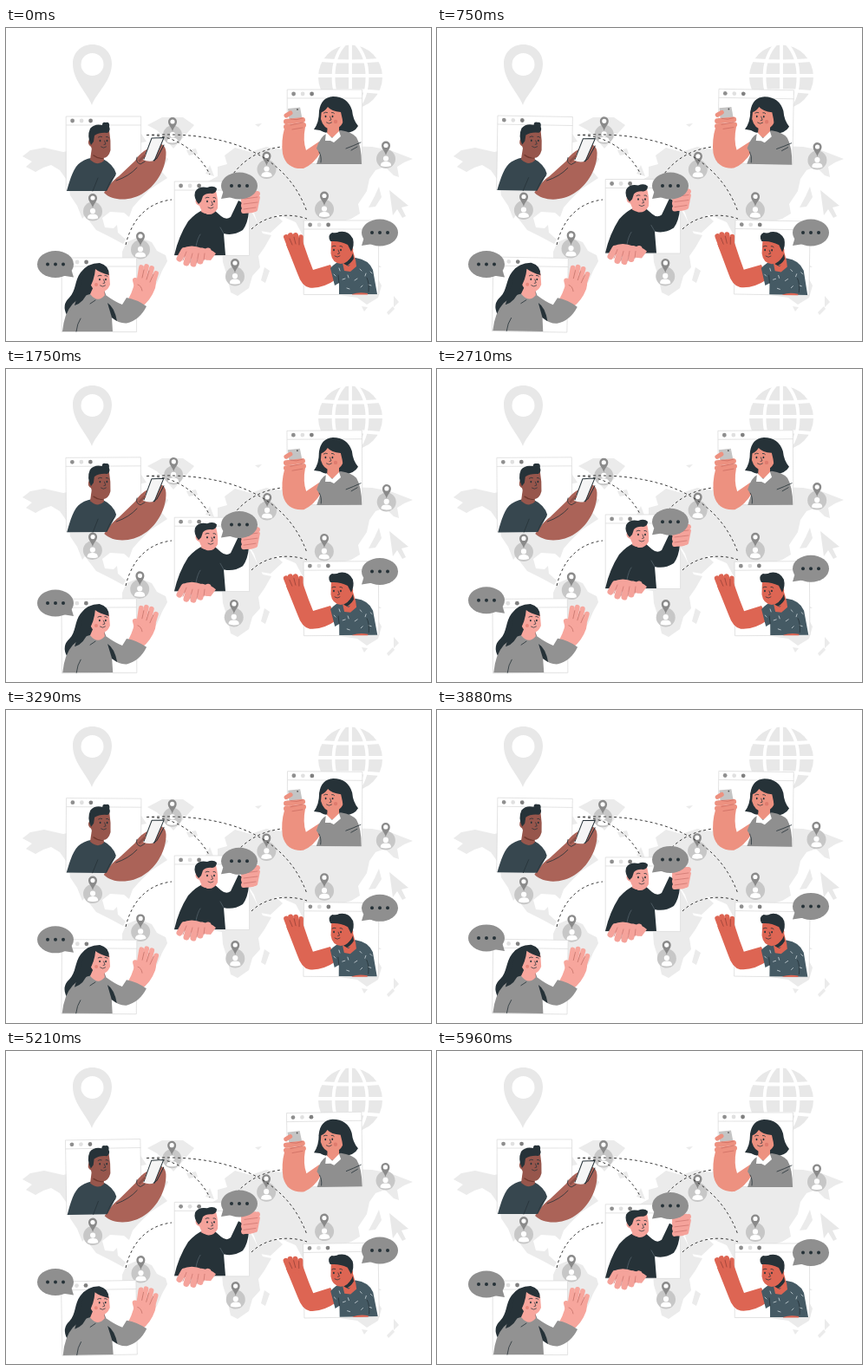
An HTML page with a canvas for the animation above (6 s loop, 490 px wide and 361 px high).

```html
<!DOCTYPE html>
<html lang="en">
<head>
<meta charset="utf-8">
<title>Video call</title>
<style>
html, body { margin: 0; width: 100%; height: 100%; overflow: hidden; background: #fff; }
canvas { display: block; width: 490px; height: 361px; }
</style>
</head>
<body>
<canvas id="stage"></canvas>
<script>
const W = 490, H = 361, LOOP = 6000;
const cv = document.getElementById('stage');
const dpr = window.devicePixelRatio || 1;
cv.width = W * dpr;
cv.height = H * dpr;
const c = cv.getContext('2d');
c.lineCap = c.lineJoin = 'round';

const INK = '#263238', SLATE = '#37474f', BLUE = '#455a64', GREY = '#8f8f8f', MAP = '#ebebeb', SOFT = '#e8e8e8';

const cache = {};
const path = d => cache[d] || (cache[d] = new Path2D(d));
function fill(color, d) { c.fillStyle = color; c.fill(path(d)); }
function line(color, w, d) { c.strokeStyle = color; c.lineWidth = w; c.stroke(path(d)); }
function oval(color, x, y, rx, ry = rx) {
  c.fillStyle = color;
  c.beginPath();
  c.ellipse(x, y, rx, ry, 0, 0, 7);
  c.fill();
}
// Thick rounded stroke, used for fingers
function finger(color, w, x1, y1, x2, y2) { line(color, w, `M${x1} ${y1}L${x2} ${y2}`); }

// Rises 10 px and returns over one loop, resting until the delay has passed
function floatY(t, delay) {
  const p = Math.max(0, t - delay) / LOOP;
  return -20 * Math.min(p, 1 - p);
}

// Linear rock of one degree each way: 0, 1, 0, -1, 0
function rock(t, period) {
  const p = (t / period + 0.25) % 1;
  return (1 - 4 * Math.abs(p - 0.5)) * Math.PI / 180;
}

function about(x, y, angle, draw) {
  c.save();
  c.translate(x, y);
  c.rotate(angle);
  c.translate(-x, -y);
  draw();
  c.restore();
}

function worldMap() {
  // North America
  fill(MAP, 'M19 148L28 141L44 138L66 143L84 139L106 143L128 135L146 139L160 146L170 139L187 151L179 165L186 173L166 186L153 199L146 207L142 218L136 213L120 212L111 219L114 230L124 231L128 227L129 236L138 244L135 249L120 241L104 233L91 216L88 220L82 205L74 193L72 178L62 164L52 158L43 161L34 166L23 160L30 154Z');
  // Greenland and northern islands
  fill(MAP, 'M163 112L180 103L204 103L217 112L209 121L201 130L193 139L183 127L174 118Z');
  fill(MAP, 'M106 128L122 121L139 126L154 119L162 131L143 135L126 132ZM208 141L219 139L221 145L211 147Z');
  // South America
  fill(MAP, 'M139 247L153 241L168 247L174 257L184 262L186 269L180 280L174 294L164 304L159 316L154 330L150 331L148 306L142 285L134 270L134 258Z');
  // Europe and Asia
  fill(MAP, 'M229 190L231 178L244 171L244 160L255 157L252 147L264 138L282 143L300 137L316 140L336 131L352 125L369 133L394 136L422 137L443 141L469 151L459 155L451 160L453 172L447 170L437 160L426 164L419 174L416 188L406 203L408 214L398 220L388 223L392 236L384 244L375 235L369 224L357 229L349 247L341 237L334 224L320 218L310 215L319 223L305 236L293 234L286 213L278 201L263 199L258 191L245 195L237 201Z');
  fill(MAP, 'M230 168L235 158L240 171ZM418 207L425 194L430 183L433 195L426 206Z');
  // Africa and Madagascar
  fill(MAP, 'M226 210L241 202L259 204L281 208L287 219L296 237L306 239L298 253L291 263L293 276L284 286L280 300L267 309L259 305L255 286L250 270L249 256L234 253L221 242L219 226ZM298 276L304 280L299 294L294 291Z');
  // Oceania
  fill(MAP, 'M368 250L383 262L397 258L392 270L379 272ZM400 263L419 266L433 276L421 276ZM374 293L390 281L407 276L416 283L423 279L433 297L429 311L416 319L405 311L384 308Z');
  fill(MAP, 'M447 309L453 316L447 322ZM446 321L448 324L441 331L439 328ZM287 111L295 110L291 114ZM410 321L417 322L413 327Z');
}

function backdrop() {
  worldMap();
  fill(SOFT, 'M99 89C94 75 77 61 77 41C77 28 87 19 99.500 19C112 19 122 28 122 41C122 61 104 75 99 89Z');
  oval('#fff', 99.5, 42, 13);
  oval(SOFT, 397, 56.5, 37, 37);
  c.lineCap = 'butt';
  line('#fff', 3.8, 'M397 18V95M358 55H436M363 37Q397 40 431 37M363 74Q397 70 431 74M391 18C373 37 373 76 391 95M403 18C421 37 421 76 403 95');
  c.lineCap = 'round';
  fill(SOFT, 'M442 187L446 216L451 209L457 219L461 217L456 207L464 205Z');
}

function links() {
  c.setLineDash([3, 3]);
  c.lineCap = 'butt';
  line('#3c3c3c', 1, 'M162 123.500C194 123 221 141 235 169M162 123.500C245 119 321 139 347 212M322 136.500C296 139 277 149 262 168M138 250C145 220 164 201 191 198M283 232C298 217 323 212 347 220');
  c.setLineDash([]);
  c.lineCap = 'round';
}

function marker(x, y) {
  c.save();
  c.translate(x, y);
  oval('#c7c7c7', 0, 0, 11);
  oval('#fff', 0, -0.5, 3.1);
  fill('#fff', 'M-6 8V6.500Q-5.500 3 0 3Q5.500 3 6 6.500V8Q0 10 -6 8Z');
  fill('#8a8a8a', 'M0 -4C-1 -9 -5 -11 -5 -15.500A5 5 0 0 1 5 -15.500C5 -11 1 -9 0 -4Z');
  oval('#fff', 0, -15.5, 2.6);
  c.restore();
}

function markers() {
  [[192, 123.5], [100, 211.5], [155, 255.5], [264, 286.5], [300.5, 163], [367, 209], [438, 151]]
    .forEach(p => marker(...p));
}

function panel(x, y) {
  x += 0.6;
  c.fillStyle = '#fff';
  c.fillRect(x, y, 86, 85.5);
  c.strokeStyle = '#dcdcdc';
  c.lineWidth = 0.8;
  c.strokeRect(x, y, 86, 85.5);
  line('#dcdcdc', 0.8, `M${x} ${y + 10}h86`);
  [GREY, '#e0e0e0', '#808080'].forEach((k, i) => oval(k, x + 7 + i * 10.5, y + 5, 2.4));
}

// Eyes, brows, nose and smile around the middle of a face
function face(x, y, gap = 8) {
  oval(INK, x - gap / 2, y, 0.9, 1.2);
  oval(INK, x + gap / 2, y, 0.9, 1.2);
  line(INK, 0.8, `M${x - gap / 2 - 2} ${y - 4}q2 -1.500 4 -0.500M${x + gap / 2 - 1} ${y - 4.5}q2 -0.500 3 1`);
  line(INK, 0.7, `M${x + 1} ${y}l1.500 4l-2 0.500M${x - 3} ${y + 7}q3 2.500 6 0`);
}

function phoneMan() {
  const skin = '#97564c', arm = '#ab6358';
  panel(69, 102);
  fill(arm, 'M113 190C119 181 124 175 130 171L149 153C153 146 159 141 168 137C176 131 184 133 184.500 143C185 160 175 180 159 190C146 199 124 201 113 190Z');
  fill(SLATE, 'M70 188C74 174 78 160 86 155Q96 148 110 150Q124 157 127 168Q123 176 116 188Z');
  line(INK, 0.8, 'M100 188L106 173M126 170Q119 177 116 187');
  fill(skin, 'M99 138L97 152Q106 160 113 153L112 145Z');
  line('#70392f', 1.4, 'M101 147Q106 151 112 150');
  fill(skin, 'M99 119L119 118Q121 130 120.500 141Q118 151 110 150Q101 148 98 137Q93 134 96 128Z');
  fill(INK, 'M98 135Q93 125 97 116Q102 110 111 112Q111 108 115 109Q120 108 119 114Q121 118 117 121Q108 120 102 124L101 131Z');
  face(112.5, 130);
  line(INK, 0.8, 'M127 176Q142 171 151 161M151 149Q149 155 155 157L160 154');
  fill('#f5f5f5', 'M168 127L182 126.500L171 153Q164 155 158 152Z');
  line(INK, 1, 'M168 127L182 126.500L171 153M168 127L159 151');
  finger('#8d5048', 2.6, 154, 153, 160, 147);
  finger(arm, 3.2, 176, 148, 181, 139);
  line(INK, 1, 'M170 153L174 150L182 135');
}

function selfieWoman() {
  const skin = '#ed9180';
  panel(324, 71);
  fill(INK, 'M355 117Q361 109 361 96Q363 80 377 79Q394 79 399 95Q400 106 406 113Q402 121 388 122Q370 123 362 118Z');
  fill(skin, 'M321 116Q317 130 319 145C322 158 331 163 343 162Q355 157 363 143L361 131L346 141Q342 130 345 114Z');
  fill(GREY, 'M358 139Q362 125 371 121L386 118Q399 120 404 126Q410 136 410 157H358L362 145Z');
  fill(skin, 'M371 110L370 123Q378 130 384 121L384 108Z');
  fill(skin, 'M364 92Q374 86 388 94L389 108Q384 118 375 117Q366 116 363 105Z');
  fill(INK, 'M361 98Q363 83 377 82Q390 83 393 104L389 114Q388 104 386 97Q375 96 371 91Q367 97 361 98Z');
  fill('#fff', 'M369 120L376 127L384 119L386 125L378 132L374 130L368 130Z');
  line(INK, 0.8, 'M392 139Q400 136 409 132M361 143Q364 148 363 155M398 141L405 137');
  face(372.5, 102, 8);
  oval('#df7b6e', 380, 108, 2.2);
  fill('#c4c4c4', 'M325 93L339 91.500L342 107L327 111Z');
  oval('#555', 336, 94, 0.9);
  finger(skin, 5, 323, 101, 328, 98);
  finger(skin, 6, 323, 108, 342, 106);
  finger(skin, 6, 323, 114, 343, 112);
  finger(skin, 6, 326, 119, 341, 118);
  line('#c9695f', 0.7, 'M328 105Q335 107 342 104M328 112L342 109M330 117L342 115');
}

function hostMan() {
  const skin = '#f5a39b';
  panel(194, 177);
  finger(skin, 9, 273, 215, 279, 204);
  fill(INK, 'M194 262Q199 240 210 223Q219 213 227 210H240L248 217Q254 222 259 218L268 199Q276 202 280 211Q279 225 273 233Q262 240 251 237L253 262Z');
  line('#53616a', 0.8, 'M251 237L247 230M219 252Q221 242 224 238');
  fill(skin, 'M226 204L225 212Q233 217 240 211L239 204Z');
  fill(skin, 'M222 192L242 188Q245 199 244 208Q240 216 232 215Q225 212 223 205Q217 203 219 197Z');
  fill(INK, 'M222 203Q216 196 218 189Q222 182 232 184Q239 181 243 185Q243 190 238 191Q231 190 227 194L225 200Z');
  face(236, 200, 8);
  fill(skin, 'M271 194Q277 188 288 188L293 195L290 210Q282 216 272 212Z');
  [192, 198, 204, 210].forEach((y, i) => finger(skin, 6, 274, y + 1, 290 - i, y - 1));
  line('#c9716c', 0.7, 'M275 197L290 195M274 203L290 201M274 209L288 207');
  fill(skin, 'M203 254Q214 249 226 254Q236 254 242 260L236 268Q216 266 203 263Z');
  for (let i = 0; i < 5; i++) finger(skin, 7, 205 + i * 7, 257, 200 + i * 8, [266, 271, 272, 269, 264][i]);
  line('#c9716c', 0.7, 'M208 258L204 268M215 260L212 271M222 260L220 271M229 260L228 268');
}

function wavingMan() {
  const skin = '#dd6553';
  panel(343, 222);
  fill(skin, 'M323 250L342 246L349 266L354 279L374 273L382 289Q365 301 350 299.500Q341 298 336 283Z');
  finger(skin, 6, 323, 241, 328, 254);
  finger(skin, 6, 328, 239, 332, 252);
  finger(skin, 6, 334, 239, 336, 252);
  finger(skin, 5.5, 340, 241, 340, 254);
  line('#8e3c34', 0.7, 'M327 243L330 250M332 241L334 249M338 242L338 250');
  fill(BLUE, 'M374 277Q380 270 388 268L403 265Q418 267 423 279L428 307H384V294L379 297Z');
  fill(skin, 'M390 258L389 270Q396 278 403 268L400 257Z');
  fill(INK, 'M390 270Q397 268 400 260L401 266Q397 273 390 275Z');
  fill(skin, 'M375 246L395 244L398 253Q402 254 399 260Q395 272 386 272Q376 271 374.500 260Z');
  fill(INK, 'M374 246Q370 239 376 236Q381 237 384 235Q395 233 400 243Q402 251 398 258L394 250Q386 246 378 246Z');
  fill(skin, 'M388 271L395 275L403 267L404 275L397 281L390 280Z');
  face(382, 256, 8);
  line('#cfd8dc', 0.8, 'M378 284l2 2M384 277l1 3M388 290l3 -1M394 285l1 3M402 291l3 -2M408 278l2 2M414 286l1 -3M418 296l3 1M409 299l2 -2M393 300l3 1M420 281l2 2');
  line(INK, 0.8, 'M384 294L383 285M418 304Q419 294 416 288');
  fill(skin, 'M399 307Q407 304 417 306V307.500H399Z');
}

function wavingWoman() {
  const skin = '#f7a69d';
  panel(64, 265);
  fill(INK, 'M70 331Q64 319 73 311C81 303 79 291 86 282Q94 271 108 271Q119 274 119 285L113 302Q119 317 107 324Q87 334 70 331Z');
  fill(skin, 'M139 315Q145 308 149 291Q154 285 168 287Q175 290 172 300Q167 314 156 322Z');
  fill('#929292', 'M65 350Q67 329 77 318Q86 309 100 306L115 308Q126 316 134 319L139 311Q151 313 162 321Q154 337 139 340.500Q130 341 122 334L123 350Z');
  fill(INK, 'M117 317Q125 322 128 338L122 334Z');
  fill(skin, 'M101 298L97 307Q106 318 114 308L113 298Z');
  fill(skin, 'M98 280Q108 272 119 283L120 296Q116 306 107 304Q98 302 96 291Z');
  fill(INK, 'M119 285Q108 282 103 278Q102 291 95 302Q90 317 79 320L91 279Q105 267 116 276Z');
  face(111.5, 290, 7);
  oval('#e7877c', 104, 296, 2);
  line(INK, 0.8, 'M81 350Q82 341 86 335M97 318L103 314');
  [[156, 276, 153, 295], [162, 275, 158, 294], [168, 277, 163, 296], [173, 283, 168, 299]]
    .forEach(f => finger(skin, 5.8, ...f));
  finger(skin, 6, 149, 291, 152, 303);
  line('#bd6b62', 0.7, 'M159 279L157 288M165 280L162 290M170 284L166 293M152 296Q156 297 157 303');
}

function bubble(x, y, side) {
  fill(GREY, `M${x + side * 8} ${y + 13}L${x + side * 21} ${y + 15}L${x + side * 18} ${y + 5}Z`);
  oval(GREY, x, y, 21, 15.5);
  [-9, 0, 9].forEach(d => oval(INK, x + d, y, 2));
}

function render(t) {
  const lift = floatY(t, 0);
  const drift = floatY(t, 1000);
  const sway = rock(t, LOOP / 2);

  c.setTransform(dpr, 0, 0, dpr, 0, 0);
  c.fillStyle = '#fff';
  c.fillRect(0, 0, W, H);
  backdrop();
  about(269, 200, rock(t, LOOP), markers);
  links();
  about(126, 148, sway, phoneMan);
  about(365, 116, sway, selfieWoman);
  c.save();
  c.translate(0, lift);
  hostMan();
  c.restore();
  about(374, 264, sway, wavingMan);
  about(120, 308, sway, wavingWoman);
  bubble(269, 182 + drift, -1);
  bubble(57, 272.5 + drift, 1);
  bubble(431, 236 + drift, -1);
}

function tick() {
  render(performance.now() % LOOP);
  requestAnimationFrame(tick);
}
tick();
</script>
</body>
</html>
```
